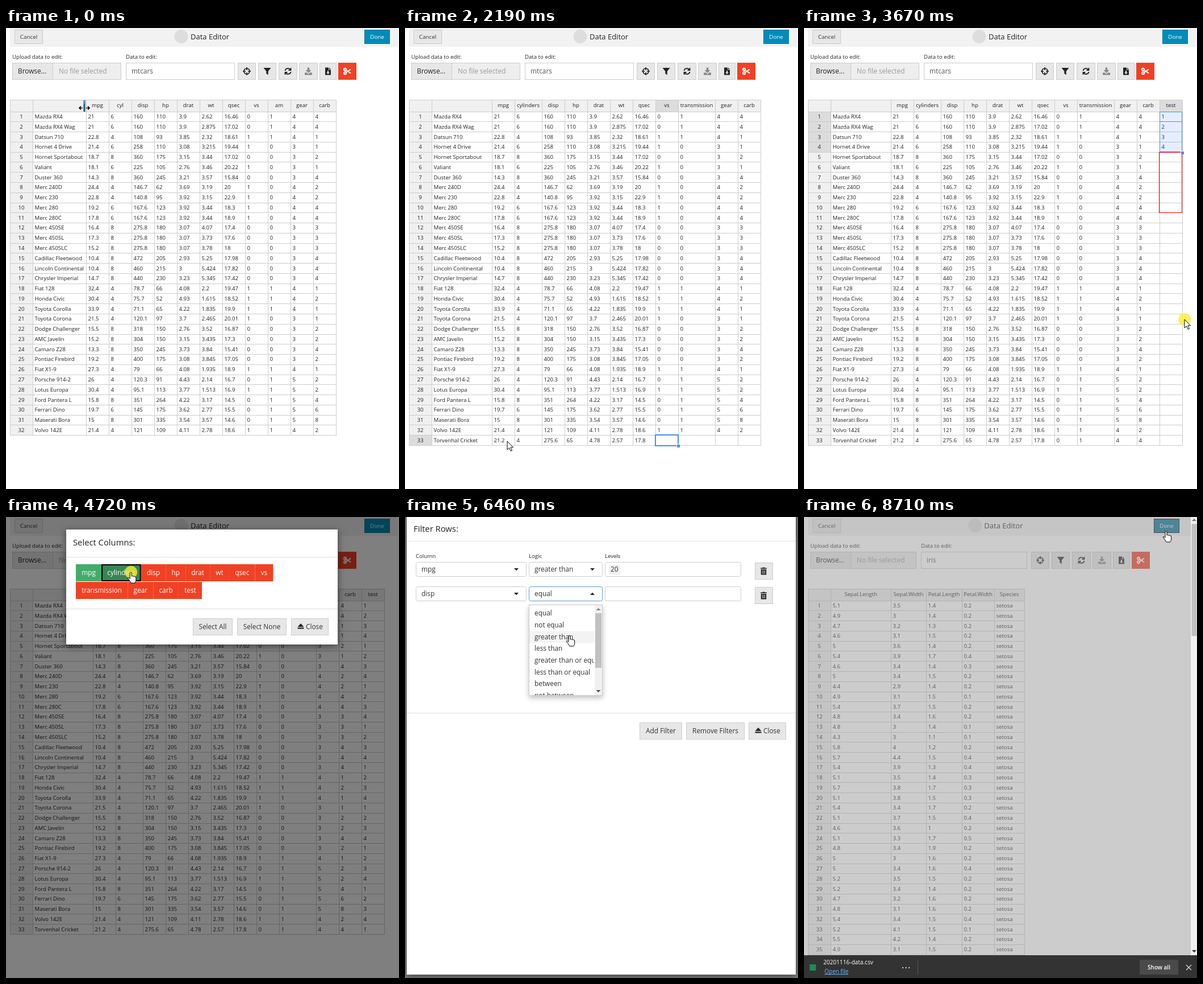
Animation, 692 px wide and 810 px high, one loop 8.74 s. Source, as an HTML page with a canvas:

```html
<!DOCTYPE html>
<html lang="en">
<head>
<meta charset="utf-8">
<title>Data Editor</title>
<style>
html, body { margin: 0; width: 100%; height: 100%; overflow: hidden; background: #fff; }
canvas { display: block; }
</style>
</head>
<body>
<canvas id="stage" width="692" height="810"></canvas>
<script>
const g = document.getElementById('stage').getContext('2d');
const LOOP = 8740;
const words = s => s.split(' ');

const names = ('Mazda RX4|Mazda RX4 Wag|Datsun 710|Hornet 4 Drive|Hornet Sportabout|Valiant|Duster 360|Merc 240D|Merc 230|' +
  'Merc 280|Merc 280C|Merc 450SE|Merc 450SL|Merc 450SLC|Cadillac Fleetwood|Lincoln Continental|Chrysler Imperial|Fiat 128|' +
  'Honda Civic|Toyota Corolla|Toyota Corona|Dodge Challenger|AMC Javelin|Camaro Z28|Pontiac Firebird|Fiat X1-9|' +
  'Porsche 914-2|Lotus Europa|Ford Pantera L|Ferrari Dino|Maserati Bora|Volvo 142E').split('|');
const mtcars = {
  mpg: words('21 21 22.8 21.4 18.7 18.1 14.3 24.4 22.8 19.2 17.8 16.4 17.3 15.2 10.4 10.4 14.7 32.4 30.4 33.9 21.5 15.5 15.2 13.3 19.2 27.3 26 30.4 15.8 19.7 15 21.4'),
  cyl: [...'66468684466888888444488884448684'],
  disp: words('160 160 108 258 360 225 360 146.7 140.8 167.6 167.6 275.8 275.8 275.8 472 460 440 78.7 75.7 71.1 120.1 318 304 350 400 79 120.3 95.1 351 145 301 121'),
  hp: words('110 110 93 110 175 105 245 62 95 123 123 180 180 180 205 215 230 66 52 65 97 150 150 245 175 66 91 113 264 175 335 109'),
  drat: words('3.9 3.9 3.85 3.08 3.15 2.76 3.21 3.69 3.92 3.92 3.92 3.07 3.07 3.07 2.93 3 3.23 4.08 4.93 4.22 3.7 2.76 3.15 3.73 3.08 4.08 4.43 3.77 4.22 3.62 3.54 4.11'),
  wt: words('2.62 2.875 2.32 3.215 3.44 3.46 3.57 3.19 3.15 3.44 3.44 4.07 3.73 3.78 5.25 5.424 5.345 2.2 1.615 1.835 2.465 3.52 3.435 3.84 3.845 1.935 2.14 1.513 3.17 2.77 3.57 2.78'),
  qsec: words('16.46 17.02 18.61 19.44 17.02 20.22 15.84 20 22.9 18.3 18.9 17.4 17.6 18 17.98 17.82 17.42 19.47 18.52 19.9 20.01 16.87 17.3 15.41 17.05 18.9 16.7 16.9 14.5 15.5 14.6 18.6'),
  vs: [...'00110101111000000111100001010001'],
  am: [...'111' + '0'.repeat(14) + '111' + '0'.repeat(5) + '1'.repeat(7)],
  gear: [...'44433334444333333444333334555554'],
  carb: [...'44112142244333444121122421224682']
};
const newRow = ['Torvenhal Cricket', ...words('21.2 4 275.6 65 4.78 2.57 17.8 0 1 4 4')];
const iris = [
  ['Sepal.Length', 106, words('5.1 4.9 4.7 4.6 5 5.4 4.6 5 4.4 4.9 5.4 4.8 4.8 4.3 5.8 5.7 5.4 5.1 5.7 5.1 5.4 5.1 4.6 5.1 4.8 5 5 5.2 5.2 4.7 4.8 5.4 5.2 5.5 4.9')],
  ['Sepal.Width', 62, words('3.5 3 3.2 3.1 3.6 3.9 3.4 3.4 2.9 3.1 3.7 3.4 3 3 4 4.4 3.9 3.5 3.8 3.8 3.4 3.7 3.6 3.3 3.4 3 3.4 3.5 3.4 3.2 3.1 3.4 4.1 4.2 3.1')],
  ['Petal.Length', 63, words('1.4 1.4 1.3 1.5 1.4 1.7 1.4 1.5 1.4 1.5 1.5 1.6 1.4 1.1 1.2 1.5 1.3 1.4 1.7 1.5 1.7 1.5 1 1.7 1.9 1.6 1.6 1.5 1.4 1.6 1.6 1.5 1.5 1.4 1.5')],
  ['Petal.Width', 57, [...'22222432212211244333242522422224122'].map(d => '0.' + d)],
  ['Species', 53, Array(35).fill('setosa')]
].map(([h, w, v]) => ({ h, w, v }));

// Pointer stops: arrival time, x, y, flags (h hand, r resize, n no click)
const stops = [
  [0, 138, 140, 'rn'], [200, 150, 140, 'rn'], [310, 215, 136], [550, 511, 136], [830, 27, 706], [950, 100, 724],
  [1400, 180, 726, 'n'], [2740, 606, 136], [2840, 646, 136], [3050, 646, 155], [3480, 646, 209], [3545, 665, 217],
  [3670, 670, 512], [3790, 668, 724], [4040, 424, 78], [4450, 146, 98, 'h'], [4600, 219, 97, 'h'], [4820, 262, 98, 'h'],
  [5020, 535, 192, 'h'], [5180, 457, 83], [5560, 450, 376, 'h'], [5660, 116, 92], [5760, 60, 126, 'h'],
  [5850, 282, 92], [5950, 290, 168, 'h'], [6040, 460, 92], [6190, 450, 376, 'h'], [6260, 116, 135],
  [6340, 60, 210, 'h'], [6400, 282, 135], [6450, 290, 208, 'hn'], [6510, 290, 208, 'h'], [6590, 470, 135],
  [6900, 638, 376, 'h'], [7250, 532, 80], [7700, 300, 78], [8470, 638, 25, 'h']
];
const icons = {
  target: ['M5 0A5 5 0 1 1-5 0A5 5 0 1 1 5 0M0-7V-2M0 2V7M-7 0H-2M2 0H7', 1.7],
  filter: ['M-6.5-6H6.5L1.7 0V6.5L-1.7 4V0Z'],
  refresh: ['M-5-1A5 5 0 0 1 4-3M5-6V-2H1M5 1A5 5 0 0 1-4 3M-5 6V2H-1', 1.8],
  download: ['M-1.7-6.5H1.7V-2H5L0 3L-5-2H-1.7ZM-6.5 2.5H-2.5L0 5L2.5 2.5H6.5V6.5H-6.5Z'],
  file: ['M-5-6.5H1V-2.5H5V6.5H-5ZM2-6.5L5-3.5H2ZM-1-1V2H-3L0 5L3 2H1V-1Z'],
  scissors: ['M-2-3.2A2 2 0 1 1-6-3.2A2 2 0 1 1-2-3.2M-2 3.2A2 2 0 1 1-6 3.2A2 2 0 1 1-2 3.2M-2.3-2.2L6 3.5M-2.3 2.2L6-3.5', 1.9],
  trash: ['M-5.5-5.5H-2L-1.5-6.5H1.5L2-5.5H5.5V-4H-5.5ZM-4.7-3H4.7V6.5H-4.7ZM-2.6-1.5V5H-1.8V-1.5ZM-.4-1.5V5H.4V-1.5ZM1.8-1.5V5H2.6V-1.5Z'],
  eject: ['M0-5L5.5 1H-5.5ZM-5.5 2.2H5.5V4.5H-5.5Z'],
  down: ['M-4-2H4L0 2.2Z'],
  up: ['M-4 2H4L0-2.2Z'],
  arrow: ['M0 0V15L3.5 11.8L6 17.3L8.5 16.3L6 10.9H10.5Z'],
  hand: ['M-2 1Q-.5-1 1 1V7Q2.5 6 3.7 7.3Q5.2 6.5 6.3 7.8Q8.3 7.3 8.7 9V14Q8.7 17 6.7 19H0Q-3 14-5.5 11Q-6 9-4 9.5L-2 11.5Z'],
  resize: ['M-9 0H-3M-6-3L-9 0L-6 3M9 0H3M6-3L9 0L6 3', 1.6]
};
for (const k in icons) icons[k][0] = new Path2D(icons[k][0]);

const clamp = v => Math.max(0, Math.min(1, v));
const typed = (s, t, a, b) => s.slice(0, Math.ceil(s.length * clamp((t - a) / (b - a))));
const fade = (t, a, b) => Math.min(clamp((t - a) / 150), clamp((b + 150 - t) / 150));

function rect(x, y, w, h, fill, line, lw = 1) {
  if (fill) { g.fillStyle = fill; g.fillRect(x, y, w, h); }
  if (line) { g.strokeStyle = line; g.lineWidth = lw; g.strokeRect(x + lw / 2, y + lw / 2, w - lw, h - lw); }
}
function box(x, y, w, h, line) {
  g.beginPath(); g.roundRect(x + .5, y + .5, w - 1, h - 1, 3);
  g.fillStyle = '#fff'; g.fill();
  g.strokeStyle = line; g.lineWidth = 1; g.stroke();
}
const setFont = (size, weight = 400) => { g.font = `${weight} ${size}px "Open Sans", sans-serif`; };
function text(s, x, y, size = 9.62, color = '#222', align = 'left', weight) {
  setFont(size, weight);
  g.fillStyle = color; g.textAlign = align;
  g.fillText(s, x, y + size * .36);
}
function icon(name, x, y, color = '#222', outline) {
  const [path, line] = icons[name];
  g.save(); g.translate(x, y);
  g.fillStyle = g.strokeStyle = color;
  if (line) { g.lineWidth = line; g.stroke(path); } else g.fill(path, 'evenodd');
  if (outline) { g.strokeStyle = outline; g.lineWidth = 1; g.stroke(path); }
  g.restore();
}
function button(x, y, w, h, label, size = 11.84) {
  rect(x, y, w, h, '#e7e7e7', '#ccc');
  text(label, x + w / 2, y + h / 2, size, '#333', 'center');
}
function closeButton(x, y) {
  rect(x, y, 66, 30, '#e7e7e7', '#ccc');
  icon('eject', x + 17, y + 14);
  text('Close', x + 26, y + 15, 11.84, '#333');
}

function mouse(t) {
  let i = stops.length - 1;
  while (i && t < stops[i][0] - 110) i--;
  while (i > 1 && t < stops[i - 1][0]) i--;
  const [at, x, y] = stops[i], [from, px, py] = stops[Math.max(0, i - 1)];
  const p = clamp(1 - (at - t) / Math.min(110, at - from || 1)), e = p * p * (3 - 2 * p);
  const now = stops.filter(s => s[0] <= t).pop() || stops[0];
  const flags = now[3] || '';
  return { x: px + (x - px) * e, y: py + (y - py) * e, flags, down: !flags.includes('n') && t - now[0] < 130 };
}
function pointer(t) {
  const m = mouse(t);
  if (m.down) {
    g.fillStyle = 'rgba(250,238,50,.8)';
    g.beginPath(); g.arc(m.x, m.y, 11, 0, 7); g.fill();
  }
  if (m.flags.includes('r') && t < 230) {
    rect(m.x - 2, 127, 4, 20, '#34a9db');
    rect(m.x - .5, 133, 1, 14, '#222');
    icon('resize', m.x, 140.5, '#000');
  } else icon(m.flags.includes('h') ? 'hand' : 'arrow', m.x, m.y, '#fff', '#000');
}

const rowY = r => r < 0 ? 126 : Math.round(146.6 + 17.77 * r);
function table(cols, rows, sel) {
  const xs = [7, 47];
  for (const c of cols) xs.push(xs.at(-1) + c.w);
  const right = xs.at(-1), bottom = rowY(rows.length);
  rect(7, 126, right - 7, 21, '#f0f0f0');
  rect(7, 126, 40, bottom - 126, '#f0f0f0');
  if (sel) {
    rect(xs[sel.c + 1], 126, cols[sel.c].w, 21, '#dcdcdc');
    if (sel.a >= 0) rect(7, rowY(sel.a), 40, rowY(sel.b + 1) - rowY(sel.a), '#dcdcdc');
  }
  for (const x of xs) rect(Math.round(x), 126, 1, bottom - 125, '#ccc');
  for (let r = -1; r <= rows.length; r++) rect(7, rowY(r), right - 6, 1, '#ccc');
  cols.forEach((c, i) => {
    const x = xs[i + 1];
    text(c.h, x + c.w / 2, 136, 9.62, '#222', 'center');
    rows.forEach((k, r) => text(c.v[k] || '', x + 3.5, 155.5 + 17.77 * r));
  });
  rows.forEach((k, r) => text(r + 1, 27, 155.5 + 17.77 * r, 9.62, '#222', 'center'));
  if (!sel || sel.a < 0) return;
  const x = xs[sel.c + 1], w = cols[sel.c].w, y = rowY(sel.a), end = rowY(sel.b + 1);
  if (sel.fill > sel.b) rect(x - 1, end, w + 1, rowY(sel.fill + 1) - end + 1, null, '#f00');
  if (sel.b > sel.a) {
    rect(x, y, w, end - y, 'rgba(75,137,255,.14)', '#4b89ff');
    rect(x, y, w, 18, null, '#4b89ff');
  } else rect(x - 1, y - 1, w + 2, end - y + 3, null, '#4b89ff', 2);
  rect(x + w - 3, end - 2, 6, 6, '#fff');
  rect(x + w - 2, end - 1, 5, 5, '#4b89ff');
}

const cellStart = i => i ? 1330 + (i - 1) * 118 : 960;
function carColumns(t) {
  const heads = Object.keys(mtcars);
  if (t > 330) heads[1] = typed('cylinders', t, 330, 500);
  if (t > 570) heads[8] = typed('transmission', t, 570, 740);
  const cols = [names, ...Object.values(mtcars)].map((v, i) => ({
    h: i ? heads[i - 1] : '',
    w: i ? i == 2 && t > 520 ? 48 : i == 9 && t > 760 ? 65 : 40 : 94 + (t < 200 ? mouse(t).x - 138 : 12),
    v: [...v, typed(newRow[i], t, cellStart(i) + 40, cellStart(i) + (i ? 95 : 340))]
  }));
  if (t > 2800) {
    const filled = t > 3860 ? 33 : Math.min(4, Math.floor((t - 3000) / 80));
    cols.push({ h: typed('test', t, 2850, 3000), w: 40, v: names.concat('').map((_, r) => r < filled ? r % 4 + 1 : '') });
  }
  return t > 5100 ? cols.slice(0, 4) : cols;
}
function selection(t) {
  if (t > 310 && t < 520) return { c: 2, a: -1 };
  if (t > 550 && t < 760) return { c: 9, a: -1 };
  if (t > 940 && t < 2620) {
    let c = 11;
    while (c && t < cellStart(c)) c--;
    return { c, a: 32, b: 32 };
  }
  if (t > 2840 && t < 3050) return { c: 12, a: -1 };
  if (t >= 3050 && t < 3380) { const r = Math.min(3, Math.max(0, Math.floor((t - 3080) / 80))); return { c: 12, a: r, b: r }; }
  if (t >= 3380 && t < 3860) {
    const under = Math.floor((mouse(t - 67).y - 146.6) / 17.77);
    return { c: 12, a: 0, b: t < 3480 ? Math.max(0, Math.min(3, under)) : 3, fill: t > 3545 ? under : 0 };
  }
  if (t >= 3860 && t < 4040) return { c: 12, a: 0, b: 32 };
}

function page(t) {
  const loaded = t >= 8090, s = loaded ? 8.5 : 0;
  rect(7, 0, 683 - s, 33, '#f2f2f2');
  button(15, 3, 50, 25, 'Cancel', 9.8);
  g.fillStyle = '#ddd';
  g.beginPath(); g.arc(308.5 - s * .85, 15, 12, 0, 7); g.fill();
  text('Data Editor', 325 - s * .9, 15, 13);
  const pressed = t > 8470, dx = loaded ? 616 : 631;
  rect(dx, 3, 45, 25, pressed ? '#007095' : '#008cba', pressed ? '#000' : '#0079a1');
  text('Done', dx + 22.5, 16, 9.7, '#fff', 'center');

  text('Upload data to edit:', 11, 50.5);
  rect(11, 61, loaded ? 187 : 192, 30, '#eee', '#ccc');
  rect(11, 61, 72, 30, '#e7e7e7', '#ccc');
  text('Browse...', 21, 76, 11.84);
  text('No file selected', 93, 76, 11.84, '#999');
  const fx = loaded ? 206 : 211;
  text('Data to edit:', fx, 50.5);
  rect(fx, 61, loaded ? 187 : 192, 30, '#fff', t > 7700 && !loaded ? '#999' : '#ccc');
  text(t > 7790 ? typed('iris', t, 7790, 8040) : 'mtcars', fx + 10, 76, 11.84, '#555');

  const focus = t > 4040 && t < 5180 ? 0 : t >= 5180 && t < 7250 ? 1 : -1;
  const canSave = t > 5100 && !loaded;
  [['target', 408, 32], ['filter', 444, 32], ['refresh', 480, 33], ['download', 516, 33], ['file', 552, 30], ['scissors', 585, 32]]
    .forEach(([name, x, w], i) => {
      x = Math.round(x - s);
      const red = i == 5, off = i == 3 && !canSave;
      rect(x, 61, w, 30, red ? '#f04124' : i == focus ? '#b9b9b9' : '#e7e7e7', i == focus ? '#000' : red ? '#f04124' : '#ccc', i == focus ? 2 : 1);
      icon(name, x + w / 2, 76, red ? '#fff' : off ? '#888' : '#222');
    });

  if (loaded) return table(iris, [...Array(36).keys()]);
  const cols = carColumns(t);
  let rows = [...Array(t > 890 ? 33 : 32).keys()];
  if (t > 6980) rows = rows.filter(r => cols[1].v[r] > 20 && cols[3].v[r] > 200);
  table(cols, rows, selection(t));
}

function modal(alpha, x, y, w, h, draw) {
  if (!alpha) return;
  g.save();
  g.globalAlpha = alpha;
  g.translate(0, -40 * (1 - alpha) ** 2);
  g.shadowColor = 'rgba(0,0,0,.5)'; g.shadowBlur = 12; g.shadowOffsetY = 3;
  rect(x, y, w, h, '#fff');
  g.shadowColor = 'transparent';
  draw();
  g.restore();
}
function columnPicker(t) {
  text('Select Columns:', 118, 45, 14.8);
  rect(106, 70, 478, 1, '#ddd');
  rect(106, 161, 478, 1, '#ddd');
  const picked = { mpg: 4450, cylinders: 4600, disp: 4820 };
  let x = 123, y = 83;
  for (const name of words('mpg cylinders disp hp drat wt qsec vs transmission gear carb test')) {
    if (name == 'transmission') { x = 123; y = 114; }
    setFont(11.84);
    const w = g.measureText(name).width + 20.4, on = t > picked[name];
    const focused = on && !Object.values(picked).some(p => p > picked[name] && t > p);
    rect(x, y, w, 30, on ? focused ? '#358753' : '#43ac6a' : '#f04124', focused ? '#000' : null, 2);
    text(name, x + w / 2, y + 15, 11.84, '#fff', 'center');
    x += w;
  }
  button(329, 178, 70, 30, 'Select All');
  button(407, 178, 87, 30, 'Select None');
  closeButton(502, 178);
}

const logics = ['equal', 'not equal', 'greater than', 'less than', 'greater than or equal', 'less than or equal', 'between', 'not between'];
function select(x, y, w, value, open) {
  box(x, y, w, 26, open ? '#5b9bd5' : '#ccc');
  text(value, x + 10, y + 13, 11.84, '#333');
  icon(open ? 'up' : 'down', x + w - 18, y + 13);
}
function menu(t, x, y, w, items, scroll) {
  const h = scroll ? 160 : items.length * 20.8 + 10, hover = Math.round((mouse(t).y - y - 15) / 20.8);
  g.save();
  g.shadowColor = 'rgba(0,0,0,.25)'; g.shadowBlur = 9; g.shadowOffsetY = 4;
  rect(x, y, w, h, '#fff');
  g.restore();
  g.save();
  g.beginPath(); g.rect(x, y, scroll ? w - 15 : w, h); g.clip();
  items.forEach((s, i) => {
    const cy = y + 15 + i * 20.7;
    if (i == hover) rect(x, cy - 10, w, 21, '#f3f3f3');
    text(s, x + 10, cy, 11.84, '#333');
  });
  g.restore();
  rect(x, y, w, h, null, '#ccc');
  if (!scroll) return;
  rect(x + w - 14, y + 1, 13, h - 2, '#f1f1f1');
  rect(x + w - 13, y + 15, 11, 96, '#c1c1c1');
  icon('up', x + w - 7.5, y + 8, '#888');
  icon('down', x + w - 7.5, y + h - 8, '#555');
}
const filters = [
  { y: 79, add: 5570, colOpen: 5660, colPick: 5765, logOpen: 5850, logPick: 5960, type: 6060, col: 'mpg', level: '20' },
  { y: 122, add: 6200, colOpen: 6260, colPick: 6345, logOpen: 6400, logPick: 6515, type: 6620, col: 'disp', level: '200' }
];
function rowFilter(t) {
  text('Filter Rows:', 15, 21, 14.8);
  rect(3, 42, 685, 1, '#e2e2e2');
  rect(3, 344, 685, 1, '#ddd');
  button(413, 361, 75, 30, 'Add Filter');
  button(495, 361, 103, 30, 'Remove Filters');
  closeButton(605, 361);
  const shown = filters.filter(f => t > f.add);
  if (shown.length) {
    text('Column', 19, 68.5);
    text('Logic', 218, 68.5);
    text('Levels', 352, 68.5);
  }
  for (const f of shown) {
    f.inCol = t > f.colOpen && t < f.colPick;
    f.inLog = t > f.logOpen && t < f.logPick;
    select(19, f.y, 195, t > f.colPick ? f.col : 'mpg', f.inCol);
    select(218, f.y, 130, t > f.logPick ? 'greater than' : 'equal', f.inLog);
    box(352, f.y, 240, 26, '#ccc');
    const level = typed(f.level, t, f.type, f.type + 100);
    if (level) {
      setFont(11.84);
      rect(359, f.y + 5, g.measureText(level).width + 6, 17, '#efefef');
      text(level, 362, f.y + 13, 11.84, '#333');
    }
    rect(616, f.y + 1, 32, 30, '#e7e7e7', '#ccc');
    icon('trash', 631.5, f.y + 16);
  }
  for (const f of shown) {
    if (f.inCol) menu(t, 19, f.y + 32, 195, ['mpg', 'cylinders', 'disp']);
    if (f.inLog) menu(t, 218, f.y + 32, 130, logics, true);
  }
}

function downloadBar() {
  rect(0, 770, 692, 40, '#333');
  rect(10, 786, 11, 11, '#1f8a4c');
  text('20201116-data.csv', 34, 782, 10.1, '#fff');
  text('Open file', 36, 798, 10, '#6cb8f6');
  rect(36, 803, 42, 1, '#6cb8f6');
  for (const x of [173, 178.5, 184]) rect(x, 791, 2, 2, '#ddd');
  rect(200, 777, 1, 27, '#555');
  rect(591, 778, 68, 26, '#4a4a4a');
  text('Show all', 625, 791, 10, '#fff', 'center', 600);
  g.strokeStyle = '#ddd'; g.lineWidth = 1.2;
  g.beginPath();
  g.moveTo(673, 787); g.lineTo(682, 796);
  g.moveTo(682, 787); g.lineTo(673, 796);
  g.stroke();
}

function draw(t) {
  rect(0, 0, 692, 810, '#fff');
  page(t);
  const pick = fade(t, 4080, 5020), filter = fade(t, 5190, 6900);
  rect(0, 0, 692, 810, `rgba(0,0,0,${Math.max(pick, filter) * .5})`);
  modal(pick && fade(t, 4180, 5020), 106, 22, 478, 202, () => columnPicker(t));
  modal(fade(t, 5370, 6900), 3, -60, 685, 864, () => rowFilter(t));
  if (t >= 8090) {
    if (t > 8560) rect(0, 0, 681, 770, 'rgba(153,153,153,.5)');
    rect(681, 0, 11, 770, '#f1f1f1');
    rect(682.5, 12, 9, 197, '#c1c1c1');
    icon('up', 687, 5, '#777');
    icon('down', 687, 763, '#333');
  }
  if (t > 7400) downloadBar();
  pointer(t);
}

const start = performance.now();
function tick() {
  draw((performance.now() - start) % LOOP);
  requestAnimationFrame(tick);
}
tick();
</script>
</body>
</html>
```
